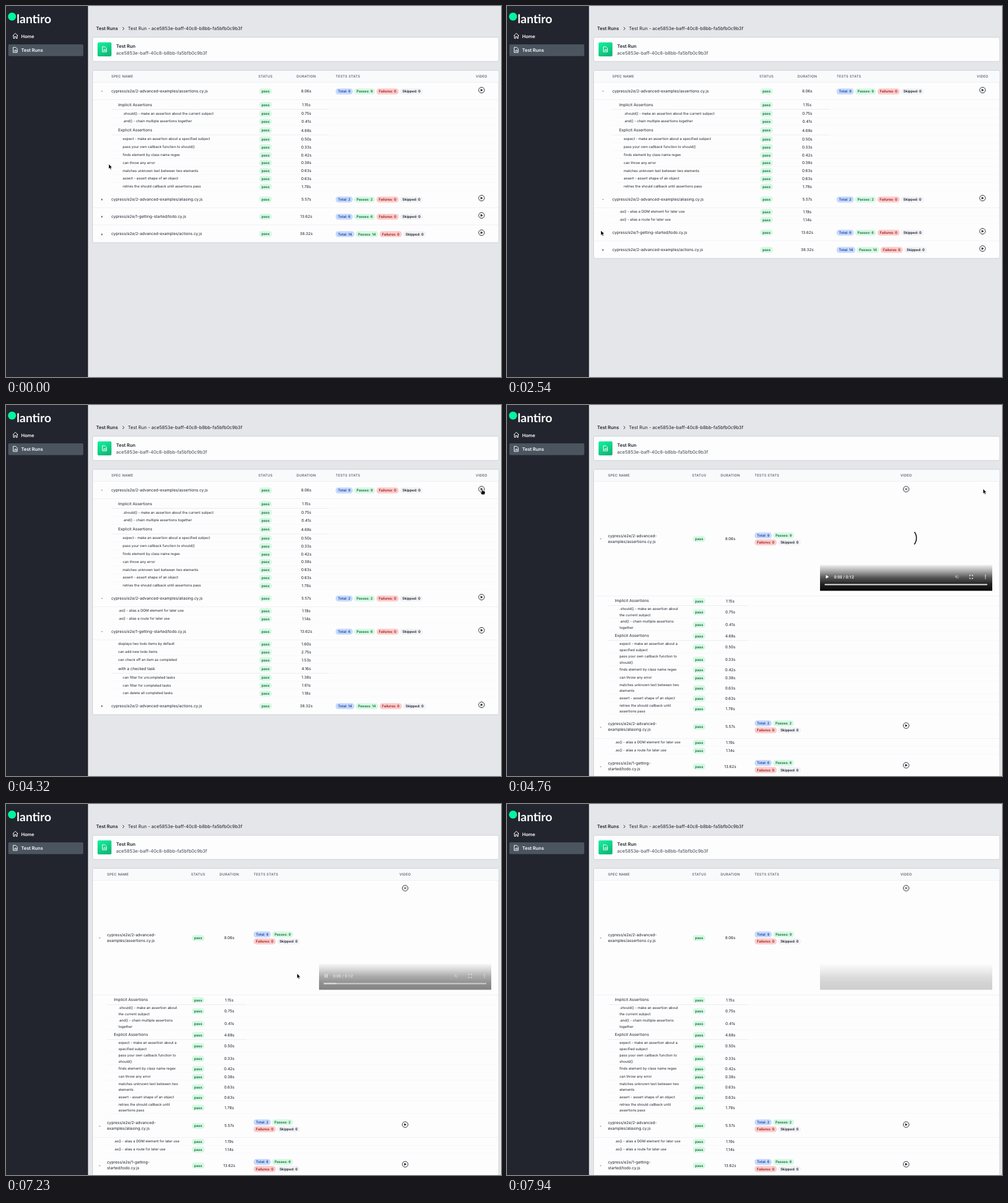
Recreate the animation shown at these times as an HTML page. Size 865 by 648 pixels, loop 8000 ms.

```html
<!DOCTYPE html>
<html lang="en">
<head>
<meta charset="utf-8">
<title>Test Runs</title>
<style>
  html, body { margin: 0; width: 100%; height: 100%; overflow: hidden; background: #e5e6ea; }
  svg { display: block; width: 865px; height: 648px; font-family: Inter, sans-serif; text-rendering: geometricPrecision; }
  .card { fill: #fdfdfe; filter: drop-shadow(0 .6px 1px #0003); }
</style>
</head>
<body>
<svg viewBox="0 0 865 648">
  <defs>
    <linearGradient id="green" x1="0" y1="0" x2=".5" y2="1">
      <stop stop-color="#10f3a0"/><stop offset="1" stop-color="#12b978"/>
    </linearGradient>
    <linearGradient id="shade" x1="0" y1="0" x2="0" y2="1">
      <stop stop-opacity=".05"/><stop offset=".25" stop-opacity=".34"/>
      <stop offset=".5" stop-opacity=".67"/><stop offset=".75" stop-opacity=".87"/>
      <stop offset="1" stop-opacity=".97"/>
    </linearGradient>
    <g id="doc" fill="none" stroke="#fff" stroke-linejoin="round" stroke-linecap="round">
      <path d="M-3.3-4.5H.8L3.5-1.8V4.5H-3.3ZM-1.6 2.5V1.2M.1 2.5V-.3M1.8 2.5V.6"/>
    </g>
    <g id="play">
      <circle r="5" fill="none" stroke="#23262d"/>
      <path d="M-1.6-2.4L2.5 0L-1.6 2.4Z" fill="#23262d"/>
    </g>
    <g id="close" fill="none" stroke="#23262d">
      <circle r="5"/><path d="M-2-2L2 2M2-2L-2 2"/>
    </g>
  </defs>

  <g id="frame"></g>
  <g id="table"></g>

  <g id="video">
    <path id="spinner" d="M14.4-10.8A18 18 0 0 1 14.4 10.8" fill="none" stroke="#111" stroke-width="1.7"/>
    <g id="controls">
      <rect x="547" y="279.3" width="301" height="45.2" fill="url(#shade)"/>
      <g id="widgets" fill="#fff">
        <circle id="hover" cx="559" cy="300" r="9.6" fill="#222"/>
        <path id="start" d="M557.4 297L562.4 300.1L557.4 303.2Z"/>
        <path id="pause" d="M556.8 297h1.7v6.2h-1.7zM560.2 297h1.7v6.2h-1.7z"/>
        <text x="571.5" y="302.7" font-family="Roboto, sans-serif" font-size="7.2" font-weight="500">0:00 / 0:12</text>
        <g opacity=".35">
          <path d="M783 298.6h1.8l2.4-2.2v7.4l-2.4-2.2H783z"/>
          <path d="M782.5 296.3l7 7.5M788.5 297.5q2.4 2.6 0 5.2" fill="none" stroke="#fff" stroke-width=".8"/>
        </g>
        <path d="M808.6 299v-1.8h1.8M812 297.2h1.8v1.8M813.8 301.6v1.8H812M810.4 303.4h-1.8v-1.8" fill="none" stroke="#fff"/>
        <path d="M836 297.4v.01M836 300.2v.01M836 303v.01" stroke="#fff" stroke-width="1.7" stroke-linecap="round"/>
        <rect x="555" y="312.6" width="284.5" height="2.1" rx="1" fill="#d6d6d6"/>
        <rect id="played" x="555" y="312.6" height="2.1" rx="1"/>
      </g>
    </g>
  </g>

  <g id="cursor" stroke="#fff" stroke-width=".6" stroke-linejoin="round">
    <path id="arrow" d="M0 0V8.6L1.9 6.8L3.2 9.7L4.7 9L3.4 6.2H6.1Z" fill="#000"/>
    <path id="hand" d="M-.9.8Q0-.4.9.8V3.6Q1.8 2.8 2.5 3.9Q3.4 3.2 4 4.3Q5 4 5.1 5.2V7L4.2 10H-.5L-3 6.5Q-2.8 5.1-.9 6.5Z" fill="#000"/>
  </g>
</svg>

<script>
const $ = id => document.getElementById(id);
const measure = document.createElement('canvas').getContext('2d');
const INK = '#1c2029', NORMAL = 6.87, SMALL = 6.1;

// y is the middle of the capital letters
const text = (x, y, str, { size = NORMAL, weight = 400, fill = INK, anchor = 'start', more = '' } = {}) =>
  `<text x="${x}" y="${y + size * .36}" font-size="${size}" font-weight="${weight}" fill="${fill}" text-anchor="${anchor}" ${more}>${str}</text>`;
const rect = (x, y, w, h, more) => `<rect x="${x}" y="${y}" width="${w}" height="${h}" ${more}/>`;
const line = (x1, x2, y, color) => rect(x1, y - .3, x2 - x1, .6, `fill="${color}"`);
const use = (id, x, y) => `<use href="#${id}" x="${x}" y="${y}"/>`;

const badgeStyles = {
  pass: ['#d6f9e3', '#13693f'], Total: ['#c6dafc', '#1e3f9e'], Passes: ['#d6f9e3', '#13693f'],
  Failures: ['#fccccc', '#9b1c1c'], Skipped: ['#f1f2f5', '#1c2029']
};
const badgeWidth = str => {
  measure.font = `600 ${SMALL}px Inter, sans-serif`;
  return measure.measureText(str).width + 8;
};
const badge = (x, y, str) => {
  const [bg, fill] = badgeStyles[str.split(':')[0]];
  return rect(x, y - 5.2, badgeWidth(str), 10.4, `rx="4.6" fill="${bg}"`) +
    text(x + 4, y, str, { size: SMALL, weight: 600, fill });
};

// "#" marks a group heading, "|" the line break used in the narrow layout
const specs = [
  { name: 'cypress/e2e/2-advanced-|examples/assertions.cy.js', time: '8.06s', total: 9, tests: [
    ['#Implicit Assertions', '1.15s'],
    ['.should() - make an assertion about |the current subject', '0.75s'],
    ['.and() - chain multiple assertions |together', '0.41s'],
    ['#Explicit Assertions', '4.68s'],
    ['expect - make an assertion about a |specified subject', '0.50s'],
    ['pass your own callback function to |should()', '0.33s'],
    ['finds element by class name regex', '0.42s'],
    ['can throw any error', '0.38s'],
    ['matches unknown text between two |elements', '0.63s'],
    ['assert - assert shape of an object', '0.63s'],
    ['retries the should callback until |assertions pass', '1.78s']] },
  { name: 'cypress/e2e/2-advanced-|examples/aliasing.cy.js', time: '5.57s', total: 2, tests: [
    ['.as() - alias a DOM element for later use', '1.19s'],
    ['.as() - alias a route for later use', '1.14s']] },
  { name: 'cypress/e2e/1-getting-|started/todo.cy.js', time: '13.62s', total: 6, tests: [
    ['displays two todo items by default', '1.60s'],
    ['can add new todo items', '2.75s'],
    ['can check off an item as completed', '1.53s'],
    ['#with a checked task', '4.16s'],
    ['can filter for uncompleted tasks', '1.38s'],
    ['can filter for completed tasks', '1.61s'],
    ['can delete all completed tasks', '1.18s']] },
  { name: 'cypress/e2e/2-advanced-|examples/actions.cy.js', time: '38.32s', total: 14, tests: [] }
];

const wideColumns = { sign: 167.5, spec: 184, status: 453.5, time: 524.7, stats: 576, video: 831, end: 564 };
const narrowColumns = { sign: 163.5, spec: 176.5, status: 335.7, time: 390.2, stats: 432.7, video: 697.5, end: 420 };

function table(openCount, minusCount, narrow) {
  const col = narrow ? narrowColumns : wideColumns;
  let y = 133.4, out = '';

  const label = (x, mid, name, size) => {
    const lines = narrow ? name.split('|') : [name.replace('|', '')];
    lines.forEach((str, i) => out += text(x, mid + (i - (lines.length - 1) / 2) * 10.3, str.trim(), { size }));
  };
  const result = (mid, time) => {
    out += badge(col.status - badgeWidth('pass') / 2, mid + .6, 'pass') +
      text(col.time, mid + .4, time, { anchor: 'middle' });
  };
  const stats = (mid, total) => {
    let x = col.stats;
    [`Total: ${total}`, `Passes: ${total}`, 'Failures: 0', 'Skipped: 0'].forEach((str, i) => {
      if (narrow && i === 2) x = col.stats;
      out += badge(x, mid + (!narrow ? .8 : i < 2 ? -5.6 : 6.6), str);
      x += badgeWidth(str) + 2.6;
    });
  };

  specs.forEach((spec, i) => {
    const playing = narrow && i === 0;
    const height = playing ? 200 : narrow ? 41.6 : 30.2;
    const mid = y + height / 2;
    out += text(col.sign, mid + .5, i < minusCount ? '-' : '+', { anchor: 'middle', weight: 500 });
    label(col.spec, mid, spec.name);
    result(mid, spec.time);
    stats(mid, spec.total);
    out += use(playing ? 'close' : 'play', col.video, playing ? 147 : mid - 1.6);
    y += height;
    if (i < 3) out += line(152, 860, y, '#e7e8ec');
    if (i >= openCount) return;

    let indent = 12;
    for (const [name, time] of spec.tests) {
      const heading = name[0] === '#';
      const rowHeight = heading ? 16.9 : narrow && name.includes('|') ? 22 : 13.85;
      if (heading) indent = 20;
      label(col.spec + (heading ? 12 : indent), y + rowHeight / 2, name.replace('#', ''), heading ? NORMAL : SMALL);
      result(y + rowHeight / 2, time);
      y += rowHeight;
      out += line(col.spec, 860, y, '#f2f3f5');
      if (heading) out += line(col.spec, col.end, y, '#e3e5e9');
    }
  });

  const head = (x, str, anchor = 'middle') => text(x, 122.9, str,
    { size: SMALL, weight: 500, fill: '#4b5362', anchor, more: 'letter-spacing=".26"' });
  return rect(152, 113, 708.5, y - 113, 'rx="2.5" class="card"') +
    rect(152, 113, 708.5, 20.4, 'rx="2.5" fill="#f9fafb"') + line(152, 860, 133.4, '#e7e8ec') +
    head(col.spec, 'SPEC NAME', 'start') + head(col.status, 'STATUS') + head(col.time, 'DURATION') +
    head(col.stats, 'TESTS STATS', 'start') + head(col.video, 'VIDEO') + out;
}

const runId = 'ace5853e-baff-40c8-b8bb-fa5bfb0c9b3f';
const bold = { size: 8, weight: 600 };
$('frame').innerHTML =
  rect(0, 0, 865, 648, 'fill="#e5e6ea"') + rect(0, 0, 143.3, 648, 'fill="#22252e"') +
  '<circle cx="10.5" cy="18.5" r="7" fill="#00f5a0"/>' +
  '<text x="18.5" y="29.7" font-family="Lato, sans-serif" font-weight="700" font-size="21" fill="#fff">lantiro</text>' +
  '<path d="M11.7 52L16.3 47.6L20.9 52M13 51V56.6H15V53.4H17.6V56.6H19.6V51" fill="none" stroke="#fff" stroke-linejoin="round"/>' +
  text(26.5, 52.8, 'Home', { ...bold, fill: '#fff' }) +
  rect(4, 67, 131, 20.5, 'rx="2" fill="#4b5560"') + use('doc', 16.2, 76.7) +
  text(26.5, 77.3, 'Test Runs', { ...bold, fill: '#fff' }) +
  text(157.5, 39.2, 'Test Runs', bold) +
  `<path d="M203.8 36.8L206.4 39.4L203.8 42" fill="none" stroke="${INK}"/>` +
  text(213, 39.2, 'Test Run - ' + runId, { size: 8 }) +
  rect(152, 55.3, 708.5, 41, 'rx="2.5" class="card"') +
  rect(160, 63.6, 24.3, 24.3, 'rx="2" fill="url(#green)"') + use('doc', 172.1, 75.7) +
  text(192.5, 70, 'Test Run', bold) + text(192.5, 82.3, runId, { size: 8, fill: '#444a55' });

const scenes = [[0, 1, 1], [1240, 1, 2], [1360, 2, 2], [2540, 2, 3], [2600, 3, 3], [4560, 3, 3, true]]
  .map(([start, ...state]) => ({ start, markup: table(...state) }));

const cursorPath = [
  [60, 179.5, 276], [180, 179, 298], [420, 179, 298], [800, 169, 344], [1120, 164, 336],
  [1720, 164, 336], [1950, 162, 366], [2180, 164, 392], [3320, 164, 392], [3650, 560, 260],
  [3900, 857, 166], [4100, 832, 148], [4150, 832, 146.5], [4800, 832, 146.5], [5330, 690, 232],
  [5650, 585, 285], [5920, 556.5, 302], [6820, 556.5, 302], [7000, 522, 298], [7150, 508.5, 296]];
const fadePath = [[7020, 1], [7230, .5], [7590, .3], [7940, .19]];

function along(path, t, ease = u => u) {
  const next = path.findIndex(key => key[0] > t);
  if (next < 0) return path.at(-1).slice(1);
  if (next === 0) return path[0].slice(1);
  const [t0, ...a] = path[next - 1], [t1, ...b] = path[next];
  const u = ease((t - t0) / (t1 - t0));
  return a.map((v, i) => v + (b[i] - v) * u);
}
const smooth = u => u * u * (3 - 2 * u);
const show = (id, on) => $(id).style.display = on ? '' : 'none';

let current;
function draw(t) {
  const scene = scenes.findLast(s => s.start <= t);
  if (scene !== current) $('table').innerHTML = (current = scene).markup;

  show('video', t >= 4560);
  show('spinner', t < 5450);
  $('spinner').setAttribute('transform', `translate(697.5 232.5) rotate(${(t - 4760) * .36})`);

  const playing = t >= 6280;
  show('start', !playing);
  show('pause', playing);
  show('hover', t >= 6820 && t < 6940);
  $('played').setAttribute('width', playing ? (t - 6280) / 12000 * 284.5 : 0);
  const [opacity] = along(fadePath, t);
  $('controls').setAttribute('opacity', opacity);
  $('widgets').setAttribute('opacity', Math.max(0, Math.min(1, (7650 - t) / 630)));

  const [x, y] = along(cursorPath, t, smooth);
  const pointing = t >= 4150 && t < 4560 || t >= 6280 && t < 6880;
  show('cursor', t < 7590);
  show('hand', pointing);
  show('arrow', !pointing);
  $('cursor').setAttribute('transform', `translate(${x} ${y})`);
}

const began = performance.now();
function tick() {
  draw((performance.now() - began) % 8000);
  requestAnimationFrame(tick);
}
tick();
</script>
</body>
</html>
```
